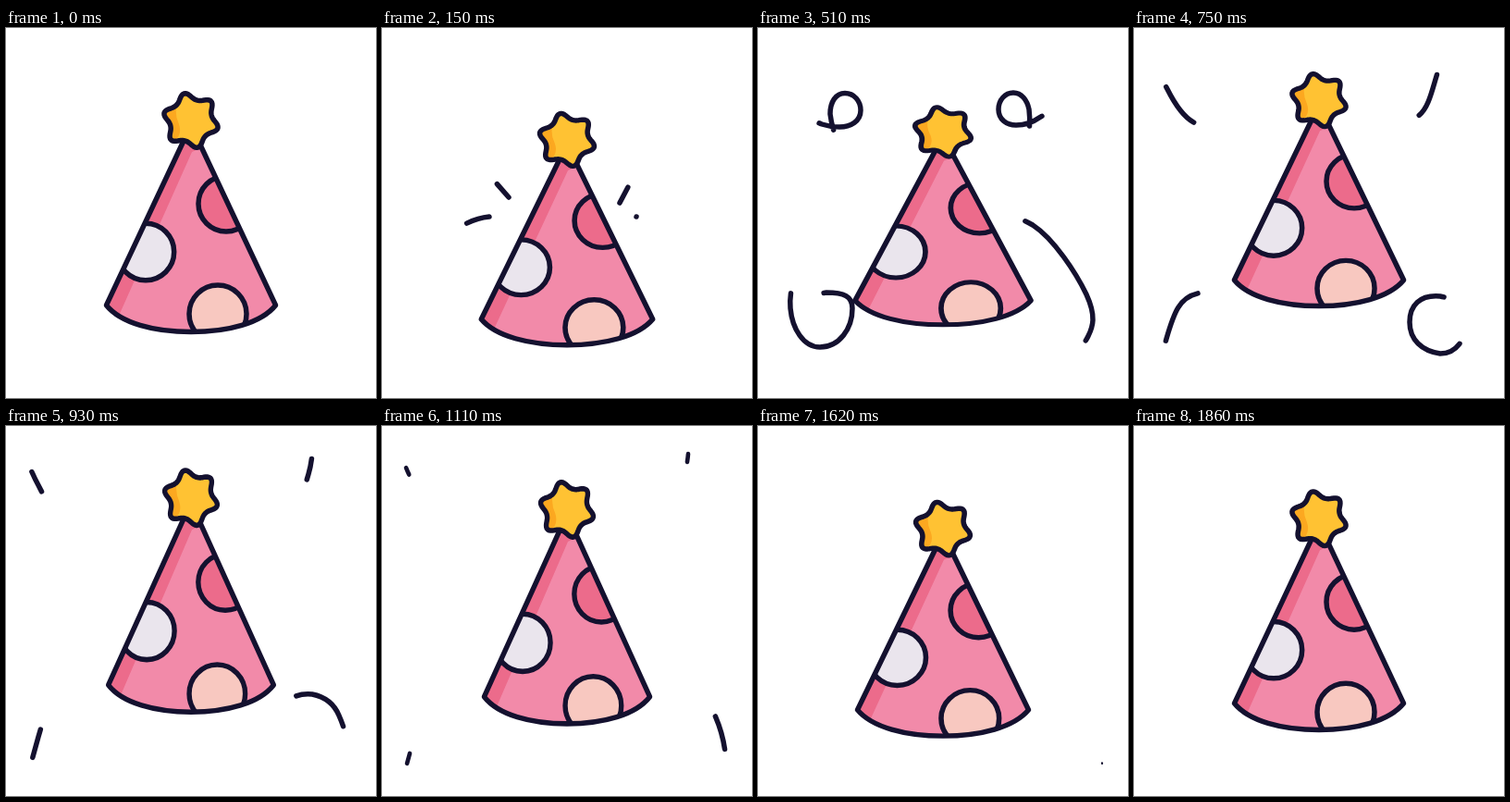
These frames come from a looping animation (400 by 400 pixels, 1.89 s). An HTML page:

```html
<!DOCTYPE html>
<html lang="en">
<head>
<meta charset="utf-8">
<title>Party hat</title>
<style>
html, body { margin: 0; width: 100%; height: 100%; overflow: hidden; background: #fff; }
svg { display: block; width: 100vw; height: 100vh; }
.line { fill: none; stroke: #14112f; stroke-width: 5.5; stroke-linecap: round; stroke-linejoin: round; }
.dot { stroke: #14112f; stroke-width: 5.5; }
</style>
</head>
<body>
<svg viewBox="0 0 400 400">
  <defs>
    <path id="cone" d="M200 105 L108.500 299.700 C124 319 160 328.500 200 328.500 S276 319 291.500 299.700 Z"/>
    <path id="star"/>
    <clipPath id="inCone"><use href="#cone"/></clipPath>
    <clipPath id="inStar"><use href="#star"/></clipPath>
  </defs>
  <g id="streamers">
    <path class="line" pathLength="1" data-start="10" data-span="1130" d="M137 183 L95 135 Q81 118 78 93 C78 80 84 70.500 94 70.500 C104 70.500 111 79 111 89 C111 101 100 107 88 107 C80 107 75 106 69 104 C55 99 45 84 36 66 Q30 55 26 45"/>
    <path class="line" pathLength="1" data-start="10" data-span="1130" d="M257 189 L287 132 Q296 113 293 88 C291 78 285 70 276 70 C267 70 260 78 260 88 C260 99 269 105 279 105 C288 105 297 102 304 97 C317 91 321 72 327 52 Q330 42 331 30"/>
    <path class="line" pathLength="1" data-start="10" data-span="1130" d="M116 204 C73 208 31 259 35 303 C37 325 49 345 67 345 C88 345 102 325 102 303 C102 290 93 286 74 286 C50 289 44 305 35 336 L27 365"/>
    <path class="line" pathLength="1" data-start="145" data-span="1320" d="M275 204 Q285 206 297 213 C320 228 344 265 355 288 C366 312 362 323 357 333 C352 343 345 352 331 352 C311 349 298 337 298 318 C298 300 309 288 331 290 C346 293 355 301 360 313 Q371 338 372 365"/>
  </g>
  <g id="hat">
    <g clip-path="url(#inCone)">
      <use href="#cone" fill="#f28aa9"/>
      <path fill="#ec6b8b" d="M90 330 L200 95 L214 128 L201 134 L122 311 Z"/>
      <circle class="dot" cx="151" cy="242" r="30.700" fill="#eae5ed"/>
      <circle class="dot" cx="238" cy="190" r="30" fill="#ec6b8b"/>
      <circle class="dot" cx="229" cy="309" r="31" fill="#f8c8c0"/>
    </g>
    <use href="#cone" class="line"/>
    <use href="#star" fill="#ffc233"/>
    <path clip-path="url(#inStar)" fill="#fca820" d="M188 72 Q180 90 187 104 Q191 116 181 123 L165 130 L160 70 Z"/>
    <use href="#star" class="line"/>
  </g>
</svg>
<script>
const LOOP = 1890, STEP = 30, TAIL_DELAY = 235;
const hat = document.getElementById('hat');
const streamers = [...document.querySelectorAll('#streamers path')];

// Six rounded points around (200, 100)
const rim = Array.from({ length: 120 }, (_, i) => {
  const a = i * Math.PI / 60, b = 6 * (a + 1.815);
  const r = 26 + 3.6 * Math.cos(b) + .5 * Math.cos(2 * b);
  return `${(200 + r * Math.cos(a)).toFixed(2)} ${(100 + r * Math.sin(a)).toFixed(2)}`;
});
document.getElementById('star').setAttribute('d', `M${rim.join('L')}Z`);

// Cubic bezier easing (.337, 0, .132, 1)
function ease(p) {
  if (p <= 0) return 0;
  if (p >= 1) return 1;
  let lo = 0, hi = 1, u;
  for (let i = 0; i < 24; i++) {
    u = (lo + hi) / 2;
    const v = 1 - u, x = 3 * v * v * u * .337 + 3 * v * u * u * .132 + u ** 3;
    if (x < p) lo = u; else hi = u;
  }
  return u * u * (3 - 2 * u);
}

// Sine-eased track through [time, value] extremes
function track(keys, t) {
  const i = keys.findIndex(k => k[0] > t);
  const [t0, a] = keys[i - 1], [t1, b] = keys[i];
  return a + (b - a) * (1 - Math.cos(Math.PI * (t - t0) / (t1 - t0))) / 2;
}

const lift = [[0, 0], [260, 29], [780, -25], [1485, 12.2], [LOOP, 0]];
const wide = [[0, 1], [405, 1.044], [1005, .974], [1470, 1.015], [LOOP, 1]];
const tall = [[0, 1], [405, .904], [1010, 1.018], [1470, .973], [LOOP, 1]];

function draw(t) {
  hat.setAttribute('transform',
    `translate(200 ${200 + track(lift, t)}) scale(${track(wide, t)} ${track(tall, t)}) translate(-200 -200)`);
  for (const s of streamers) {
    const { start, span } = s.dataset;
    const head = ease((t - start) / span), tail = ease((t - start - TAIL_DELAY) / span);
    s.style.display = head > 0 && tail < 1 ? '' : 'none';
    s.style.strokeDasharray = `${head - tail} 2`;
    s.style.strokeDashoffset = -tail;
    s.style.strokeWidth = Math.min(5.5, 2 + 90 * (1 - tail));
  }
}

const begin = performance.now();
function tick() {
  const t = (performance.now() - begin) % LOOP;
  draw(Math.floor(t / STEP) * STEP);
  requestAnimationFrame(tick);
}
tick();
</script>
</body>
</html>
```
